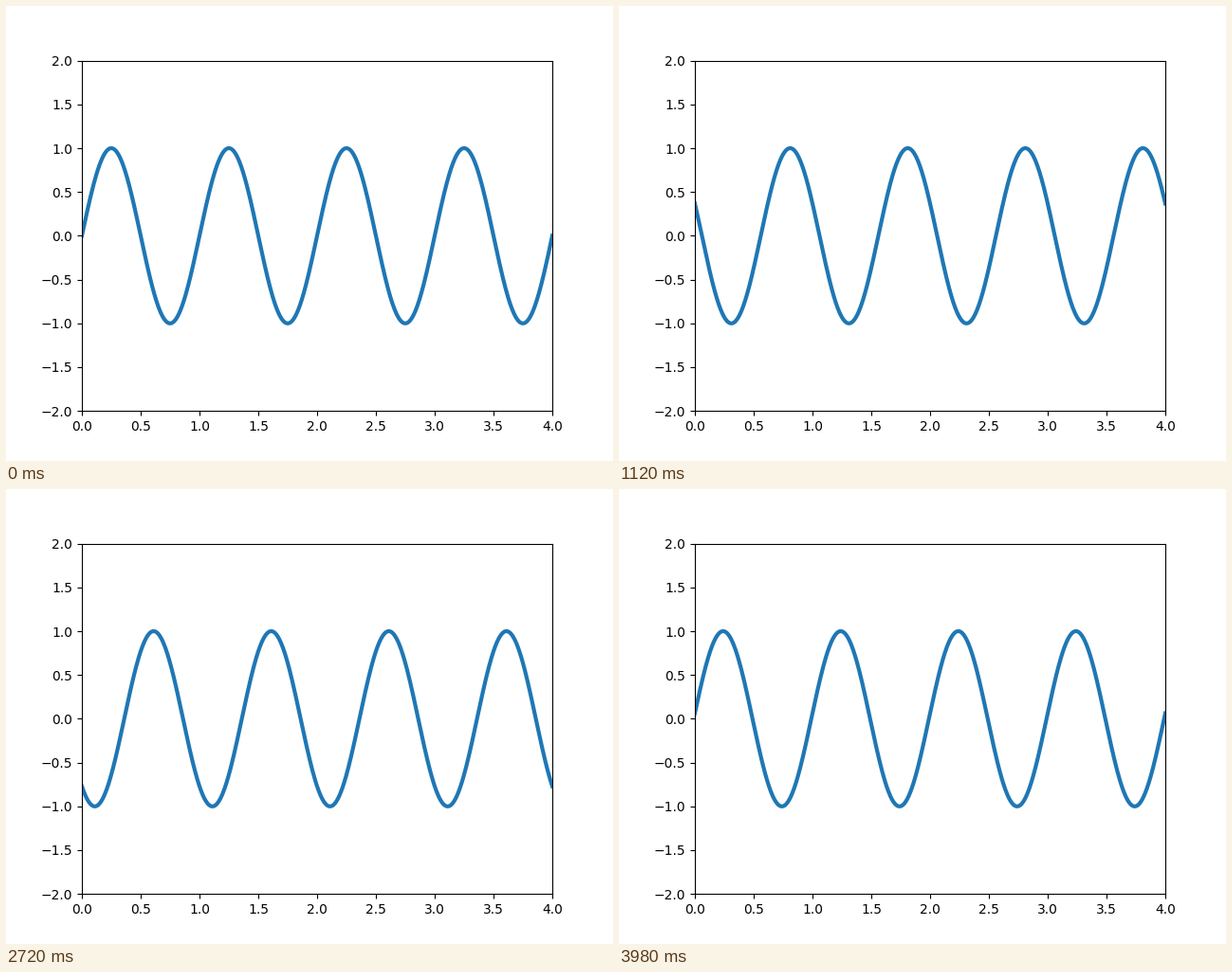
Recreate the animation shown at these times as a matplotlib script. Size 640 px wide and 480 px high, loop 4000 ms.

```python
import numpy as np
import matplotlib.pyplot as plt
from matplotlib.animation import FuncAnimation

FRAMES = 200
INTERVAL = 20  # ms
SHIFT = 0.01   # distance the wave travels per frame

fig = plt.figure(figsize=(6.4, 4.8), dpi=100)
ax = plt.axes(xlim=(0, 4), ylim=(-2, 2))
x = np.linspace(0, 4, 1000)
line, = ax.plot([], [], lw=3)


def init():
    line.set_data([], [])
    return line,


def animate(i):
    line.set_data(x, np.sin(2 * np.pi * (x - SHIFT * i)))
    return line,


anim = FuncAnimation(fig, animate, init_func=init, frames=FRAMES,
                     interval=INTERVAL, repeat=True, repeat_delay=0)

plt.show()
```
